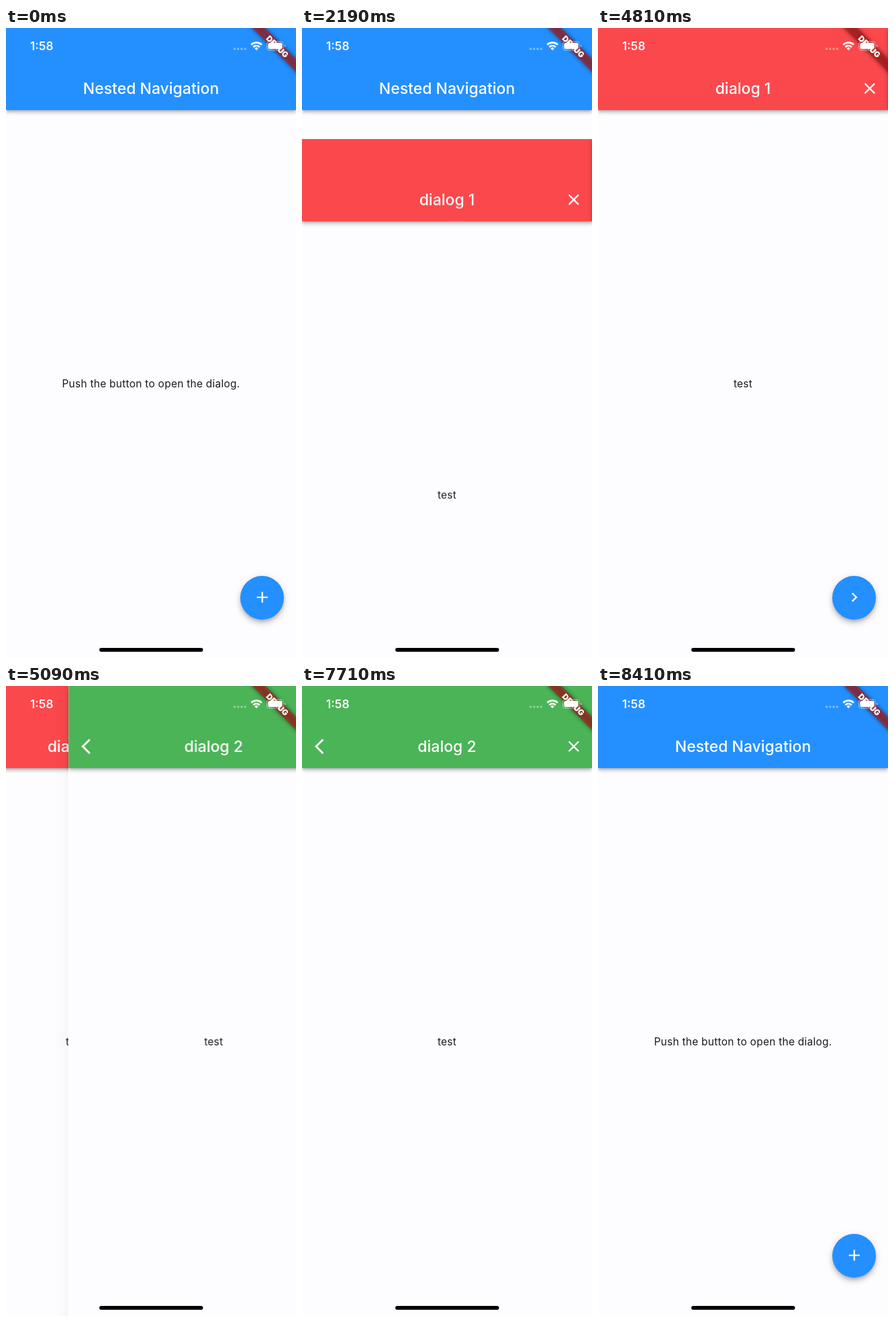
Write an HTML page that moves like this. It is 432 by 936 pixels and loops after 8.48 s.

```html
<!DOCTYPE html>
<html lang="en">
<head>
<meta charset="utf-8">
<title>Nested Navigation</title>
<style>
  :root {
    --blue: #2490ff;
    --loop: 8480ms;
    --slide: cubic-bezier(.35, .91, .33, .97);
  }
  html, body { margin: 0; width: 100%; height: 100%; overflow: hidden; }
  body { position: relative; background: #fdfcff; font-family: Inter, "Noto Sans", sans-serif; }
  svg { display: block; fill: #fff; }

  .stage, .page, .dialog, .overlay { position: absolute; top: 0; left: 0; width: 432px; height: 936px; }
  .stage, .dialog { overflow: hidden; }
  .page { background: #fdfcff; }

  .bar {
    position: absolute; top: 0; left: 0; width: 432px; height: 122px;
    background: var(--bar);
    box-shadow: 0 2px 4px -1px rgba(0, 0, 0, .2), 0 4px 5px rgba(0, 0, 0, .14), 0 1px 9px rgba(0, 0, 0, .1);
  }
  .title, .text { position: absolute; left: 0; width: 100%; text-align: center; white-space: nowrap; }
  .title { top: 75px; line-height: 30px; font-size: 23px; font-weight: 500; color: #fff; }
  .text { top: 519px; line-height: 20px; font-size: 15.5px; letter-spacing: .25px; color: #1b1b1f; }

  .icon { position: absolute; width: 27.6px; height: 27.6px; }
  .close { left: 390.7px; top: 76.2px; }
  .back { left: 18.5px; top: 76.2px; }
  .fab {
    position: absolute; left: 349px; top: 813.5px; width: 65px; height: 65px;
    border-radius: 50%; background: var(--blue);
    box-shadow: 0 3px 5px -1px rgba(0, 0, 0, .2), 0 6px 9px rgba(0, 0, 0, .14), 0 1px 14px rgba(0, 0, 0, .08);
  }
  .fab .icon { left: 18.7px; top: 18.7px; }

  .home { --bar: var(--blue); }
  .first { --bar: #fb484c; }
  .second { --bar: #4ab457; }
  .edge {
    position: absolute; left: -21.6px; top: 0; width: 21.6px; height: 100%;
    background: linear-gradient(to left, rgba(0, 0, 0, .04), transparent);
  }

  .dialog { animation: present var(--loop) infinite; }
  .first { animation: recede var(--loop) infinite; }
  .second { animation: push var(--loop) infinite; }
  .edge { animation: shade var(--loop) infinite; }

  /* Up from 1930 to 2430 ms, down from 7870 to 8370 ms. */
  @keyframes present {
    0% { transform: translateY(100%); animation-timing-function: step-end; }
    22.759% { transform: translateY(100%); animation-timing-function: var(--slide); }
    28.656% { transform: none; animation-timing-function: step-end; }
    92.807% { transform: translateY(0); animation-timing-function: var(--slide); }
    98.703%, 100% { transform: translateY(100%); }
  }
  /* Sideways from 4850 to 5350 ms. */
  @keyframes recede {
    0%, 57.193% { transform: translateX(0); animation-timing-function: var(--slide); }
    63.09%, 100% { transform: translateX(-33.333%); }
  }
  @keyframes push {
    0%, 57.193% { transform: translateX(100%); animation-timing-function: var(--slide); }
    63.09%, 100% { transform: translateX(0); }
  }
  @keyframes shade {
    0%, 57.193% { opacity: 0; animation-timing-function: var(--slide); }
    63.09%, 100% { opacity: 1; }
  }
</style>
</head>
<body>
<svg width="0" height="0" style="position:absolute">
  <symbol id="add" viewBox="0 0 24 24"><path d="M19 13h-6v6h-2v-6H5v-2h6V5h2v6h6z"/></symbol>
  <symbol id="next" viewBox="0 0 24 24"><path d="M10 6 8.59 7.41 13.17 12l-4.58 4.59L10 18l6-6z"/></symbol>
  <symbol id="back" viewBox="0 0 24 24"><path d="M11.67 3.87 9.9 2.1 0 12l9.9 9.9 1.77-1.77L3.54 12z"/></symbol>
  <symbol id="close" viewBox="0 0 24 24"><path d="M19 6.41 17.59 5 12 10.59 6.41 5 5 6.41 10.59 12 5 17.59 6.41 19 12 13.41 17.59 19 19 17.59 13.41 12z"/></symbol>
</svg>

<div class="stage">
  <section class="page home">
    <div class="bar"><div class="title">Nested Navigation</div></div>
    <div class="text">Push the button to open the dialog.</div>
    <div class="fab"><svg class="icon"><use href="#add"/></svg></div>
  </section>

  <div class="dialog">
    <section class="page first">
      <div class="bar">
        <div class="title">dialog 1</div>
        <svg class="icon close"><use href="#close"/></svg>
      </div>
      <div class="text">test</div>
      <div class="fab"><svg class="icon"><use href="#next"/></svg></div>
    </section>
    <section class="page second">
      <div class="edge"></div>
      <div class="bar">
        <svg class="icon back"><use href="#back"/></svg>
        <div class="title">dialog 2</div>
        <svg class="icon close"><use href="#close"/></svg>
      </div>
      <div class="text">test</div>
    </section>
  </div>

  <svg class="overlay" viewBox="0 0 432 936">
    <defs>
      <filter id="soft" x="-20%" y="-100%" width="140%" height="300%"><feGaussianBlur stdDeviation="3"/></filter>
    </defs>
    <!-- corner ribbon -->
    <g transform="translate(432 0) rotate(45)">
      <rect x="-50" y="32.3" width="100" height="13.8" fill="#000" opacity=".5" filter="url(#soft)"/>
      <rect x="-50" y="32.3" width="100" height="13.8" fill="#b71c1c" fill-opacity=".627"/>
      <text y="43.4" font-size="11.75" font-weight="900" text-anchor="middle">DEBUG</text>
    </g>
    <!-- status bar -->
    <text x="36" y="33" font-size="17.3" font-weight="600">1:58</text>
    <g opacity=".4">
      <circle cx="340.6" cy="31" r="1.8"/><circle cx="345.8" cy="31" r="1.8"/>
      <circle cx="351" cy="31" r="1.8"/><circle cx="356.2" cy="31" r="1.8"/>
    </g>
    <g fill="none" stroke="#fff" stroke-width="2.7">
      <path d="M365.3 24.9a11 11 0 0 1 15.6 0M368.4 28.2a6.6 6.6 0 0 1 9.4 0"/>
    </g>
    <path d="M373.1 33.2l-2.8-2.9a4 4 0 0 1 5.6 0z"/>
    <rect x="388.6" y="20.1" width="24.8" height="13" rx="4" fill="none" stroke="#fff" stroke-opacity=".45" stroke-width="1.1"/>
    <rect x="390.4" y="21.9" width="21.2" height="9.4" rx="2.4"/>
    <path d="M415 24.6q1.8.6 1.8 2t-1.8 2z" opacity=".45"/>
    <!-- home indicator -->
    <rect x="139" y="921" width="154.5" height="5.7" rx="2.85" fill="#000"/>
  </svg>
</div>
</body>
</html>
```
